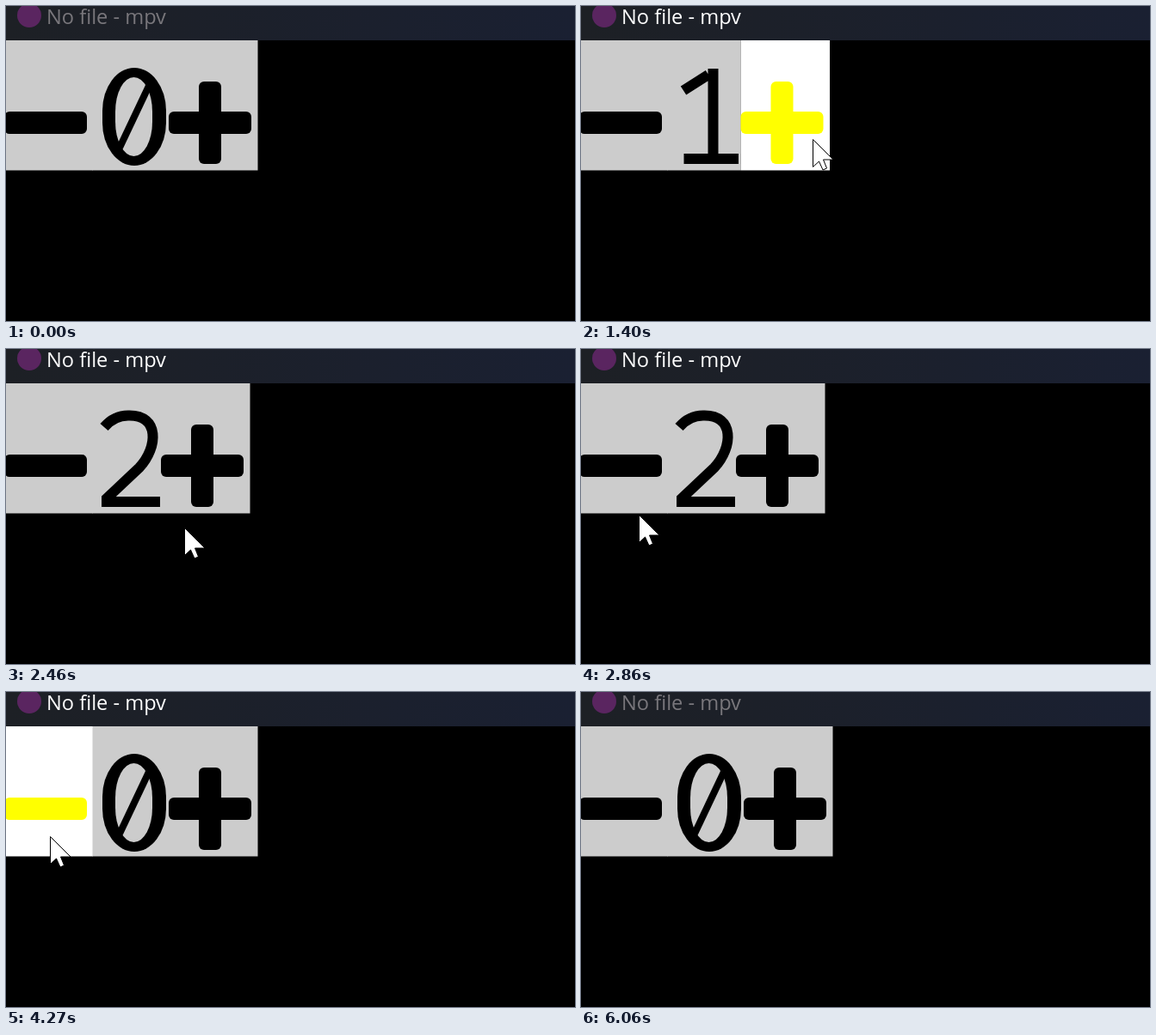
An HTML page for the animation above (6130 ms loop, 661 by 367 pixels).

```html
<!DOCTYPE html>
<html lang="en">
<head>
<meta charset="utf-8">
<title>Counter</title>
<style>
  html, body { margin: 0; width: 100%; height: 100%; overflow: hidden; background: #000; }
  svg { display: block; }
  text { font: 23.6px "Open Sans", "Noto Sans", sans-serif; }
  .box { fill: #ccc; }
  .hover .box { fill: #fff; }
  .hover .bar { fill: #ff0; }
  .digit path { fill: none; stroke: #000; stroke-width: 12; }
  .digit .slash { stroke-width: 8; }
</style>
</head>
<body>
<svg width="661" height="367">
  <linearGradient id="shade">
    <stop stop-color="#1d2025"/>
    <stop offset="1" stop-color="#1a2032"/>
  </linearGradient>
  <rect width="661" height="40" fill="url(#shade)"/>
  <circle cx="27" cy="11" r="14" fill="#5a2560"/>
  <text id="title" x="47" y="21">No file - mpv</text>

  <rect id="panel" class="box" x="100" y="40" height="151.5"/>
  <g id="minus">
    <rect class="box" y="40" width="100.5" height="151.5"/>
    <rect class="bar" x="-2" y="123" width="96" height="26" rx="6"/>
  </g>
  <g class="digit">
    <rect x="112" y="72" width="74" height="114" rx="37" ry="50"/>
    <rect class="box" x="127" y="83" width="43" height="92" rx="21.5" ry="40"/>
    <path class="slash" d="M132 165L166 93"/>
  </g>
  <g class="digit">
    <path d="M119 98.5L148 80M153.5 73V178H183M154 178H119.5"/>
  </g>
  <g class="digit">
    <path d="M114 91Q126 77 143 77.5C178 77 177 114 155 138L117 174V178H179"/>
  </g>
  <g id="plus">
    <rect class="box" y="40" width="103.5" height="151.5"/>
    <rect class="bar" y="123" width="96" height="26" rx="6"/>
    <rect class="bar" x="35" y="88" width="26" height="96" rx="6"/>
  </g>
  <path id="cursor" d="M.5 .5V32.5L7.5 26L12 36L16.5 34L12.5 24H24Z" fill="#fff" stroke="#000"/>
</svg>
<script>
const LOOP = 6130, STEP = 1000 / 15;
const $ = id => document.getElementById(id);
const digits = document.querySelectorAll(".digit");

const linear = k => k;
const easeOut = k => 1 - (1 - k) ** 2;
const smooth = k => k * k * (3 - 2 * k);

// Times below are in steps of 1/15 s.
const clicks = [17, 27, 49, 62];
const entry = { x: 571, y: 340, at: 5 };
const moves = [
  { from: 5, to: 13, x: 269, y: 155, bow: 0, ease: easeOut },
  { from: 33.5, to: 43, x: 67, y: 193, bow: 50, ease: smooth },
  { from: 43, to: 45, x: 27, y: 149, bow: 0, ease: linear },
  { from: 47, to: 50, x: 51, y: 168, bow: 0, ease: linear },
  { from: 74, to: 80, x: 528, y: 358, bow: 33, ease: linear }
];

function pointerAt(step) {
  let { x, y } = entry;
  for (const move of moves) {
    if (step < move.from) break;
    const k = move.ease(Math.min(1, (step - move.from) / (move.to - move.from)));
    x += (move.x - x) * k;
    y += (move.y - y) * k + move.bow * Math.sin(Math.PI * k);
  }
  return { x, y, visible: step >= entry.at && step <= moves.at(-1).to };
}

function render(now) {
  const step = Math.floor((now % LOOP + 7) / STEP);
  // Two clicks up, then two down.
  const value = 2 - Math.abs(2 - clicks.filter(c => c <= step).length);
  const end = [189, 185.5, 180][value];
  const { x, y, visible } = pointerAt(step);
  const hover = (id, left, right) =>
    $(id).classList.toggle("hover", visible && y < 191 && x >= left && x < right);

  $("title").setAttribute("fill", step >= 1 && step < 91 ? "#fff" : "#79777c");
  digits.forEach((digit, i) => digit.style.display = i === value ? "" : "none");
  $("panel").setAttribute("width", end - 100);
  $("plus").setAttribute("transform", `translate(${end})`);
  hover("minus", 0, 100);
  hover("plus", end, end + 103.5);
  $("cursor").style.display = visible ? "" : "none";
  $("cursor").setAttribute("transform", `translate(${Math.round(x)} ${Math.round(y)})`);
}

const start = performance.now();
function tick() {
  render(performance.now() - start);
  requestAnimationFrame(tick);
}
tick();
</script>
</body>
</html>
```
